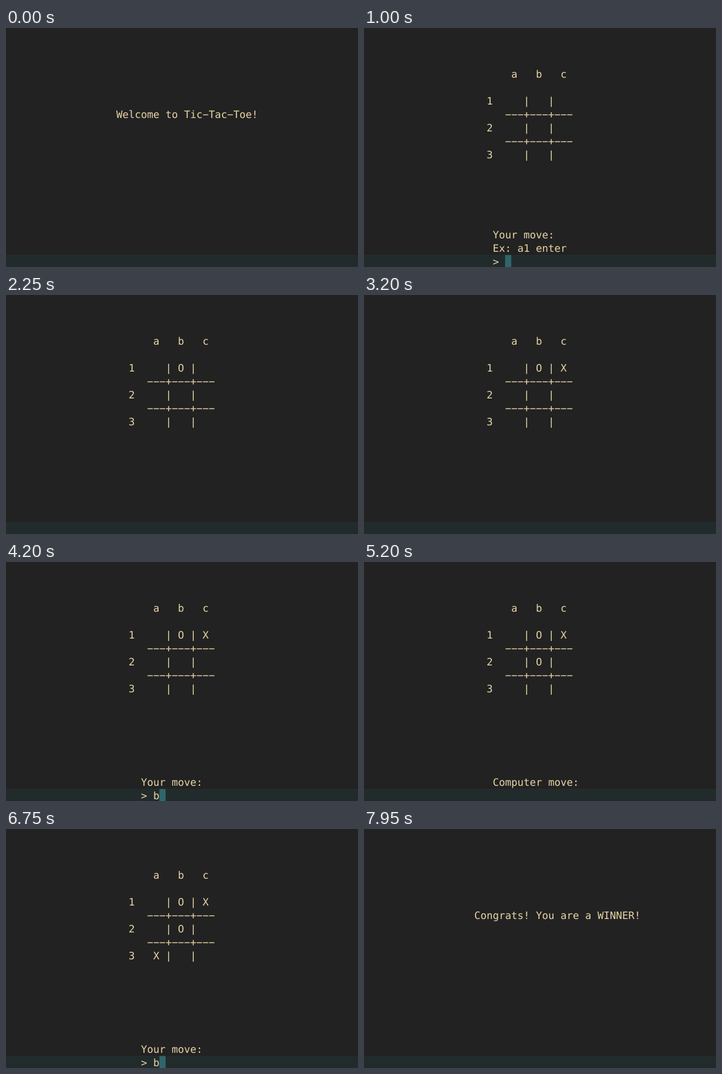
Recreate the animation shown at these times as an HTML page. Size 600x409 px, loop 8 s.

```html
<!DOCTYPE html>
<html lang="en">
<head>
<meta charset="utf-8">
<title>Tic-Tac-Toe</title>
<style>
  html, body { margin: 0; width: 100%; height: 100%; overflow: hidden; background: #222; }
  svg { display: block; width: 600px; height: 409px; }
  text {
    font: 17.44px "DejaVu Sans Mono", "Liberation Mono", monospace;
    font-variant-ligatures: none;
    fill: #e8d5a6;
    white-space: pre;
    text-rendering: geometricPrecision;
  }
</style>
</head>
<body>
<svg viewBox="0 0 600 409">
  <rect width="600" height="409" fill="#222"/>
  <rect y="388" width="600" height="21" fill="#222b2b"/>
  <rect id="cursor" y="388.5" width="10.5" height="20.5" fill="#2f666b"/>
  <g id="screen"></g>
</svg>
<script>
const LOOP = 8000, LEFT = 188, CELL = 10.5, TOP = 85, LINE = 22.93;
const LAST = 14;
const screen = document.getElementById('screen');
const cursor = document.getElementById('cursor');

// Row 0 holds the column letters; row -1 is only used while scrolled.
const rows = [];
for (let r = -1; r <= LAST; r++) {
  const el = document.createElementNS('http://www.w3.org/2000/svg', 'text');
  el.setAttribute('x', LEFT);
  el.setAttribute('y', TOP + LINE * r);
  screen.append(el);
  rows.push(el);
}

const pad = (n, s) => ' '.repeat(n) + s;
const title = s => ({ lines: { 3: s } });

// cells: nine characters, row by row
function board(cells, extra = {}) {
  const lines = { 0: pad(6, 'a   b   c') };
  for (let i = 0; i < 3; i++) {
    const [a, b, c] = cells.slice(i * 3, i * 3 + 3);
    lines[2 + 2 * i] = pad(2, `${i + 1}   ${a} | ${b} | ${c}`);
    if (i < 2) lines[3 + 2 * i] = pad(5, '−−−+−−−+−−−');
  }
  return { lines: { ...lines, ...extra } };
}

function ask(cells, typed, first) {
  const col = first ? 3 : 4;
  const extra = { [LAST]: pad(col, '> ' + typed) };
  if (first) {
    extra[12] = pad(col, 'Your move:');
    extra[13] = pad(col, 'Ex: a1 enter');
  } else {
    extra[13] = pad(col, 'Your move:');
  }
  return { ...board(cells, extra), cursor: col + 2 + typed.length };
}

const computer = cells => board(cells, { 13: pad(3, 'Computer move:') });

// Enter on the bottom line pushes everything up by one row.
function scrolled(state) {
  const lines = {};
  for (const r in state.lines) lines[r - 1] = state.lines[r];
  return { lines };
}

const empty = '         ';
const one = ' O       ';
const two = ' OX      ';
const three = ' OX O    ';
const four = ' OX O X  ';
const won = ' OX O XO ';

const script = [
  [0, title('Welcome to Tic−Tac−Toe!')],
  [600, ask(empty, '', true)],
  [1250, ask(empty, 'b', true)],
  [1500, ask(empty, 'b1', true)],
  [1800, scrolled(ask(empty, 'b1', true))],
  [1850, board(one)],
  [2450, computer(one)],
  [2950, board(two)],
  [3400, ask(two, '')],
  [4150, ask(two, 'b')],
  [4550, ask(two, 'b2')],
  [4700, scrolled(ask(two, 'b2'))],
  [4750, board(three)],
  [5200, computer(three)],
  [5700, board(four)],
  [6150, ask(four, '')],
  [6700, ask(four, 'b')],
  [7000, ask(four, 'b3')],
  [7150, board(won)],
  [7550, title('Congrats! You are a WINNER!')]
];

let shown;
function show(state) {
  if (state === shown) return;
  shown = state;
  rows.forEach((el, i) => { el.textContent = state.lines[i - 1] || ''; });
  const on = state.cursor !== undefined;
  cursor.setAttribute('visibility', on ? 'visible' : 'hidden');
  if (on) cursor.setAttribute('x', LEFT + CELL * state.cursor);
}

const start = performance.now();
function tick() {
  const t = (performance.now() - start) % LOOP;
  show(script.findLast(([at]) => at <= t)[1]);
  requestAnimationFrame(tick);
}
tick();
</script>
</body>
</html>
```
